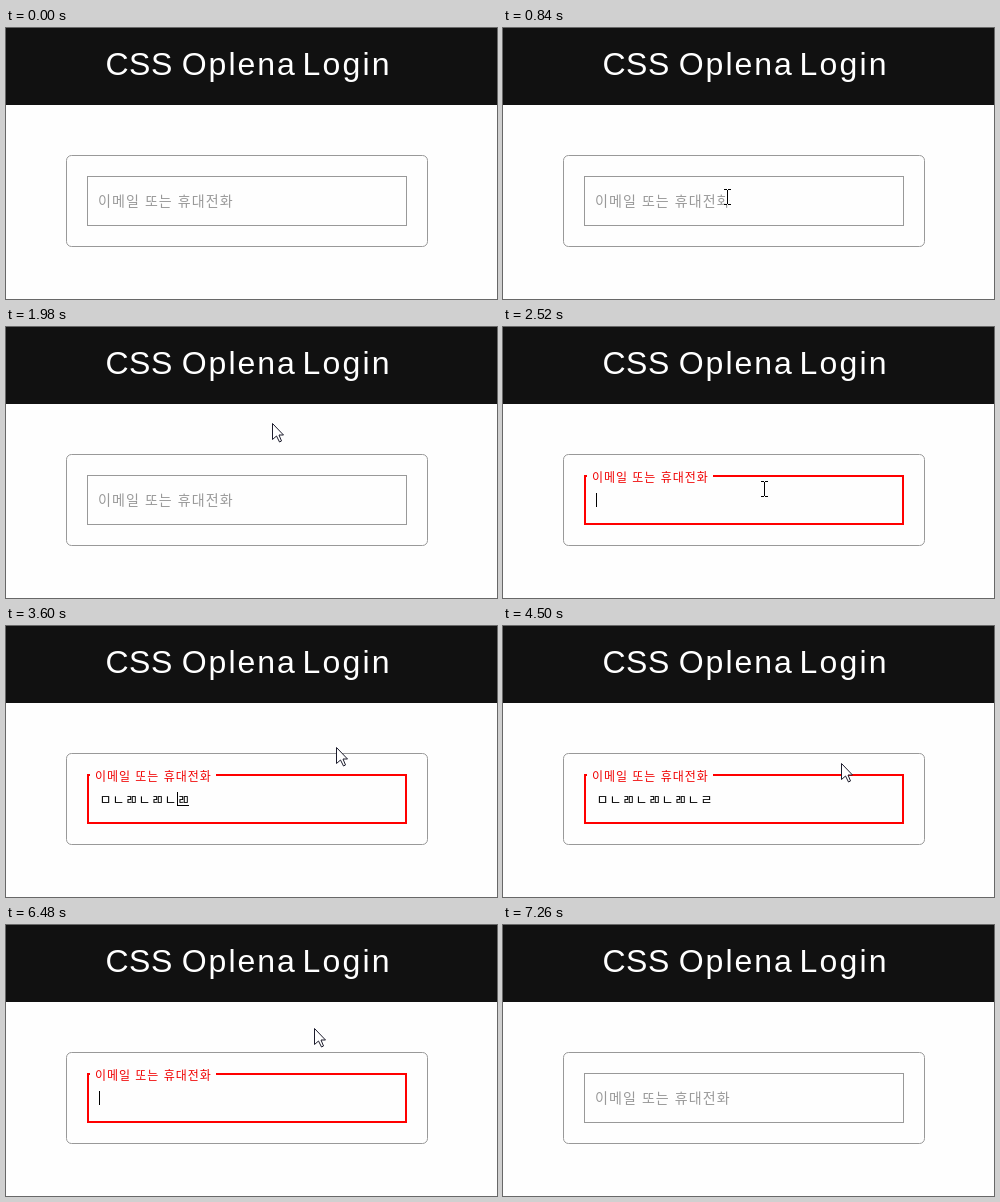
These frames come from a looping animation (491x271 px, 8 s). An HTML page with a canvas:

```html
<!DOCTYPE html>
<html lang="ko">
<head>
<meta charset="utf-8">
<title>Login field</title>
<style>
html, body { margin: 0; width: 100%; height: 100%; overflow: hidden; background: #fefefe; }
canvas { display: block; }
</style>
</head>
<body>
<canvas id="stage" width="491" height="271"></canvas>
<script>
const ctx = document.getElementById('stage').getContext('2d');
const LOOP = 8000, STEP = 60;
const PAPER = '#fefefe';
const KOREAN = '"Noto Sans CJK KR", "Noto Sans CJK", sans-serif';
const LATIN = '"Liberation Sans", Arial, sans-serif';
const LABEL = '이메일 또는 휴대전화';
const TEXT_X = 93, CELL = 13;

// Each visible stretch of the pointer: time, x, y.
const ENTER = [[420, 483, 79], [600, 331, 134], [660, 280, 147], [840, 224, 169],
  [1560, 224, 169], [1680, 243, 131], [1800, 266, 96], [1980, 266, 96],
  [2220, 261, 162], [2820, 261, 162]];
const SELECT = [[3300, 266, 160], [3420, 290, 147], [3600, 330, 121], [3780, 350, 99],
  [4140, 350, 99], [4620, 334, 150], [4980, 334, 150], [5160, 220, 166], [5400, 60, 173]];
const LEAVE = [[5640, 0, 206], [6000, 160, 175], [6300, 290, 118], [6480, 308, 103],
  [6900, 308, 103], [7080, 372, 88], [7260, 505, 19]];
const PATHS = [ENTER, SELECT, LEAVE];

// Focus and blur moments; the label glides for GLIDE ms after each.
const TOGGLES = [[900, 1], [1800, 0], [2340, 1], [6540, 0]];
const GLIDE = 180;

const KEY_TIMES = [2820, 2880, 3000, 3180, 3240, 3300, 3420, 3480, 3540, 3600, 3660, 3780];
const COMMIT = 3960, DRAG = 5040, ERASE = 6000;

const mix = (a, b, k) => a + (b - a) * k;

function text(str, x, y, font, color, spacing = 0, wordGap = 0) {
  ctx.font = font;
  ctx.letterSpacing = spacing + 'px';
  ctx.wordSpacing = wordGap + 'px';
  ctx.fillStyle = color;
  ctx.fillText(str, x, y);
}

function rect(x, y, w, h, color) {
  ctx.fillStyle = color;
  ctx.fillRect(x, y, w, h);
}

function pointerAt(t) {
  const path = PATHS.find(p => t >= p[0][0] && t < p[p.length - 1][0]);
  if (!path) return null;
  const i = path.findIndex(p => p[0] > t);
  const [t0, x0, y0] = path[i - 1], [t1, x1, y1] = path[i];
  const k = (t - t0) / (t1 - t0);
  return { x: Math.round(mix(x0, x1, k)), y: Math.round(mix(y0, y1, k)) };
}

function focusAt(t) {
  const last = TOGGLES.filter(e => e[0] < t).pop();
  if (!last) return { on: 0, lift: 0 };
  const k = Math.min(1, (t - last[0]) / GLIDE);
  return { on: last[1], lift: last[1] ? k : 1 - k };
}

// The keys ㅁ ㄴ ㄹ repeat; ㄹ followed by ㅁ merges into ㄻ.
function typedAt(t) {
  if (t >= ERASE) return '';
  const count = KEY_TIMES.filter(k => k <= t).length;
  return 'ㅁㄴㄹ'.repeat(4).slice(0, count).replace(/ㄹㅁ/g, 'ㄻ');
}

function drawHeader() {
  rect(0, 0, 491, 77, '#111');
  const font = '32px ' + LATIN;
  text('CSS', 99.5, 47, font, '#fff', 0.5);
  text('Oplena', 175.7, 47, font, '#fff', 2);
  text('Login', 296.5, 47, font, '#fff', 2.2);
}

function drawField({ on, lift }) {
  ctx.lineWidth = 1;
  ctx.strokeStyle = '#999';
  ctx.beginPath();
  ctx.roundRect(60.5, 127.5, 361, 91, 5);
  ctx.stroke();

  if (on) {
    ctx.lineWidth = 2;
    ctx.strokeStyle = '#f00';
    ctx.strokeRect(82, 149, 318, 48);
  } else {
    ctx.strokeRect(81.5, 148.5, 319, 49);
  }

  const size = mix(14, 12, lift), x = mix(92, 89, lift), y = mix(178, 155, lift);
  const red = Math.round(mix(153, 240, lift)), rest = Math.round(mix(153, 0, lift));
  rect(x - 5, y - size, mix(135, 117, lift) + 9, size + 3, PAPER);
  text(LABEL, x, y, `${size}px ${KOREAN}`, `rgb(${red}, ${rest}, ${rest})`,
    mix(1.1, 0.96, lift), 0.7);
}

function drawCaret(x) {
  rect(x, 166, 1, 14, '#000');
}

function drawInput(t, pointer, on) {
  const typed = typedAt(t), n = typed.length;
  const font = '13px ' + KOREAN;
  const cellX = i => TEXT_X + i * CELL;

  if (!n) {
    const start = t >= ERASE ? ERASE : t >= 2340 ? 2370 : 930;
    if (on && (t - start) % 1000 < 500) drawCaret(TEXT_X);
    return;
  }

  let from = n;
  if (t >= DRAG) {
    from = pointer ? Math.round((pointer.x - TEXT_X) / CELL) : 0;
    if (t >= 5400) from = 0;
    from = Math.max(0, Math.min(n, from));
  }
  text(typed.slice(0, from), TEXT_X + 0.5, 178, font, '#000', 1.04);
  if (from < n) {
    rect(cellX(from), 166, (n - from) * CELL, 14, '#3390ff');
    text(typed.slice(from), cellX(from) + 0.5, 178, font, '#fff', 1.04);
  }

  if (t < COMMIT) {
    rect(cellX(n - 1), 179, CELL - 1, 1, '#000');
    drawCaret(cellX(n - 1));
  } else if (t >= 4560 && t < DRAG) {
    drawCaret(cellX(n));
  }
}

function drawArrow(x, y) {
  ctx.beginPath();
  [[0, 0], [0, 16], [4, 12.5], [7, 18.5], [9, 17.5], [6.5, 11.5], [11, 11.5]]
    .forEach(([dx, dy]) => ctx.lineTo(x + dx + 0.5, y + dy + 0.5));
  ctx.closePath();
  ctx.fillStyle = '#fff';
  ctx.fill();
  ctx.lineWidth = 1;
  ctx.strokeStyle = '#1c1c2c';
  ctx.stroke();
}

function drawBeam(x, y) {
  rect(x - 1, y - 7, 3, 14, '#fff');
  rect(x, y - 7, 1, 14, '#000');
  for (const dy of [-8, 7]) {
    rect(x - 3, y + dy, 3, 1, '#000');
    rect(x + 1, y + dy, 3, 1, '#000');
  }
}

function drawPointer(p) {
  const inside = p.x > 81 && p.x < 401 && p.y > 148 && p.y < 198;
  (inside ? drawBeam : drawArrow)(p.x, p.y);
}

function draw(t) {
  const pointer = pointerAt(t), focus = focusAt(t);
  rect(0, 0, 491, 271, PAPER);
  drawHeader();
  drawField(focus);
  drawInput(t, pointer, focus.on);
  if (pointer) drawPointer(pointer);
}

const begin = performance.now();
function tick() {
  const t = (performance.now() - begin) % LOOP;
  draw(Math.floor(t / STEP) * STEP);
  requestAnimationFrame(tick);
}
tick();
</script>
</body>
</html>
```
